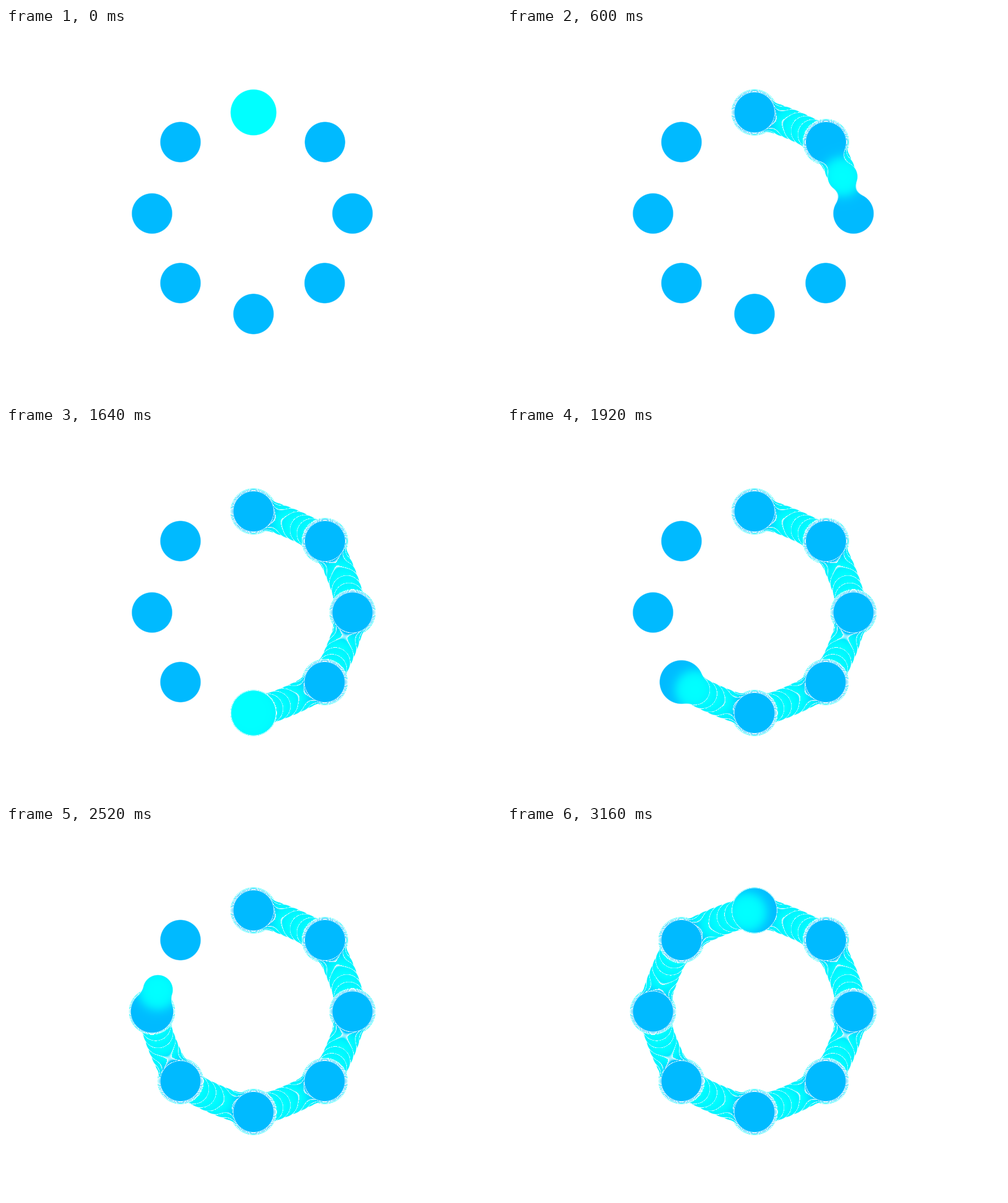
Write an HTML page with a canvas that moves like this. It is 800 px wide and 600 px high and loops after 3200 ms.

```html
<!DOCTYPE html>
<html lang="en">
<head>
<meta charset="utf-8">
<title>Gooey loader</title>
<style>
html, body { margin: 0; width: 100%; height: 100%; overflow: hidden; background: #fff; }
canvas { display: block; }
</style>
</head>
<body>
<canvas id="stage" width="800" height="600"></canvas>
<script>
const ctx = document.getElementById('stage').getContext('2d');
const STEP = 40, STEPS = 80, PER_DOT = 10;
const LEFT = 190, TOP = 90, SIZE = 420;
const CENTER = [398, 299];
const DOTS = [[400, 136.5], [515.5, 184.5], [560, 300], [515, 412.5],
              [400, 462.5], [282, 412.5], [236, 300], [282, 184.5]];
const DOT_R = 32.6, SWELL = 4.4, BALL_R = 24, GOO = 33, REACH = 115;

const image = ctx.createImageData(SIZE, SIZE);
const pixels = image.data;

const bump = (x, width) => Math.exp(-((x / width) ** 2));

// Index of the nearest dot for each pixel
const nearest = new Uint8Array(SIZE * SIZE);
for (let y = 0, i = 0; y < SIZE; y++) {
  for (let x = 0; x < SIZE; x++, i++) {
    let best = Infinity;
    DOTS.forEach(([dx, dy], j) => {
      const d = (x + LEFT + 0.5 - dx) ** 2 + (y + TOP + 0.5 - dy) ** 2;
      if (d < best) { best = d; nearest[i] = j; }
    });
  }
}

function ballAt(step) {
  const k = Math.floor(step / PER_DOT);
  const p = (step % PER_DOT) / PER_DOT;
  const leave = bump(p, 0.15);
  const u = p * (1 - 0.95 * leave);
  const a = DOTS[k], b = DOTS[(k + 1) % DOTS.length];
  const x = a[0] + (b[0] - a[0]) * u;
  const y = a[1] + (b[1] - a[1]) * u;
  const out = 20 * u * (1 - u) / Math.hypot(x - CENTER[0], y - CENTER[1]);
  return {
    x: x + (x - CENTER[0]) * out,
    y: y + (y - CENTER[1]) * out,
    glow: 31 + 29 * leave
  };
}

// A dot swells while the ball is within half a hop of it
function dotRadius(j, step) {
  const gap = Math.abs(step / PER_DOT - j);
  const hops = Math.min(gap, DOTS.length - gap);
  return DOT_R + SWELL * Math.max(0, 1 - 2 * hops);
}

// Smooth union of two distances
function blend(a, b, k) {
  const h = Math.max(0, 1 - Math.abs(a - b) / k);
  return Math.min(a, b) - h * h * k / 4;
}

// Paint one step over the earlier ones; soft rims leave pale lines in the trail
function paint(step) {
  const ball = ballAt(step);
  const radii = DOTS.map((_, j) => dotRadius(j, step));
  const reach = step ? REACH : 2 * SIZE;
  const lo = v => Math.max(0, Math.floor(v - reach));
  const hi = v => Math.min(SIZE, Math.ceil(v + reach));
  if (!step) pixels.fill(255);
  for (let y = lo(ball.y - TOP); y < hi(ball.y - TOP); y++) {
    for (let x = lo(ball.x - LEFT); x < hi(ball.x - LEFT); x++) {
      const i = y * SIZE + x, j = nearest[i];
      const px = x + LEFT + 0.5, py = y + TOP + 0.5;
      const bx = px - ball.x, by = py - ball.y;
      const dx = px - DOTS[j][0], dy = py - DOTS[j][1];
      const toBall = Math.sqrt(bx * bx + by * by);
      const toDot = Math.sqrt(dx * dx + dy * dy);
      // The goo is strongest between the two centres
      const cos = (bx * dx + by * dy) / (toBall * toDot + 0.01);
      const goo = GOO * (1 - cos) / 2 + 0.01;
      const edge = blend(toBall - BALL_R, toDot - radii[j], goo);
      const alpha = Math.min(1, 0.5 - edge * 0.75);
      if (alpha < 0.04) continue;
      const green = 186 + 69 / (1 + Math.exp((toBall - ball.glow) / 5));
      pixels[i * 4] = 255 * (1 - alpha);
      pixels[i * 4 + 1] = 255 + (green - 255) * alpha;
    }
  }
}

let shown = -1;
function show(step) {
  if (step === shown) return;
  if (step < shown) shown = -1;
  while (shown < step) paint(++shown);
  ctx.putImageData(image, LEFT, TOP);
}

const start = performance.now();
function tick() {
  show(Math.floor((performance.now() - start) / STEP) % STEPS);
  requestAnimationFrame(tick);
}
ctx.fillStyle = '#fff';
ctx.fillRect(0, 0, 800, 600);
tick();
</script>
</body>
</html>
```
